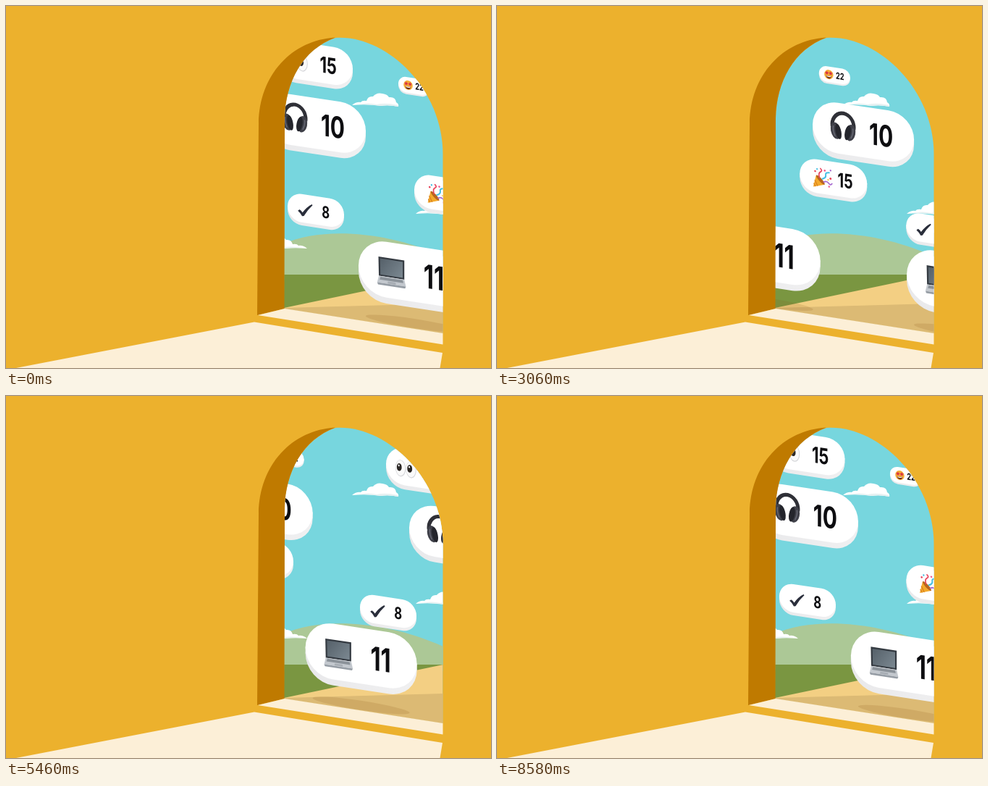
These frames come from a looping animation (670 by 500 pixels, 8.61 s). An HTML page with a canvas:

```html
<!DOCTYPE html>
<html lang="en">
<head>
<meta charset="utf-8">
<title>Archway</title>
<style>
  html, body { margin: 0; width: 100%; height: 100%; overflow: hidden; background: #ecb12d; }
  canvas { display: block; }
</style>
</head>
<body>
<canvas id="stage" width="670" height="500"></canvas>
<script>
const ctx = document.getElementById('stage').getContext('2d');
const LOOP = 8610;
const TICK = 30;
const SLOPE = 0.152;   // tilt of the plane the pills lie and travel on
const NARROW = 0.73;   // foreshortening of lettering on that plane
const LAP = 273.4;

function fill(color, path) {
  ctx.fillStyle = color;
  ctx.fill(path);
}

function poly(color, ...pts) {
  ctx.beginPath();
  for (let i = 0; i < pts.length; i += 2) ctx.lineTo(pts[i], pts[i + 1]);
  ctx.closePath();
  ctx.fillStyle = color;
  ctx.fill();
}

function oval(color, x, y, rx, ry, turn = 0) {
  ctx.beginPath();
  ctx.ellipse(x, y, rx, ry, turn, 0, Math.PI * 2);
  ctx.fillStyle = color;
  ctx.fill();
}

function line(color, width, d) {
  ctx.strokeStyle = color;
  ctx.lineWidth = width;
  ctx.lineCap = 'round';
  ctx.stroke(new Path2D(d));
}

function star(color, cx, cy, r) {
  const pts = [];
  for (let i = 0; i < 10; i++) {
    const a = i * Math.PI / 5 - Math.PI / 2;
    const q = i % 2 ? r * 0.5 : r;
    pts.push(cx + q * Math.cos(a), cy + q * Math.sin(a));
  }
  poly(color, ...pts);
}

// Icons are drawn in pill units: the pill is 140 wide, centred on 0,0.
const icons = {
  headphones() {
    ctx.strokeStyle = '#2f3037';
    ctx.lineWidth = 5;
    ctx.beginPath();
    ctx.ellipse(-28, -3, 15, 17.5, 0, Math.PI * 0.95, Math.PI * 2.05);
    ctx.stroke();
    oval('#3f4049', -38, 5, 7, 11.5, -0.2);
    oval('#3f4049', -18, 5, 7, 11.5, 0.2);
    oval('#24252c', -34.5, 5.5, 4, 10.5, -0.2);
    oval('#24252c', -21.5, 5.5, 4, 10.5, 0.2);
    line('#686a76', 1.3, 'M-41.5-1Q-42.5 5-39 12M-14.5-1Q-13.5 5-17 12');
  },

  laptop() {
    poly('#343a41', -45, -14, -12.5, -14, -12.5, 10, -44.5, 10);
    const g = ctx.createLinearGradient(-42, -12, -14, 8);
    g.addColorStop(0, '#56616a');
    g.addColorStop(1, '#7c8992');
    poly(g, -43, -12, -14.5, -12, -14.5, 8, -42.5, 8);
    poly('#c3c8ce', -44.5, 10, -12.5, 10, -10.5, 18.5, -46.5, 18.5);
    poly('#8b9299', -42.5, 11, -14.5, 11, -13.7, 14.5, -43.5, 14.5);
    poly('#a7adb4', -33, 15.5, -23.5, 15.5, -23, 18, -33.6, 18);
    poly('#969da5', -46.5, 18.5, -10.5, 18.5, -11.5, 21, -45.5, 21);
  },

  check() {
    fill('#2a2e3b', new Path2D('M-44.5 8.5L-40.5 5Q-36 7-33 11.5Q-23-4-10-12.5L-8-10.5Q-20 2-29.5 19.5L-34 20.5Q-38 13-44.5 8.5Z'));
  },

  eyes() {
    for (const x of [-43, -23.5]) {
      oval('#d6d7da', x, 5, 9.8, 15.5);
      oval('#fafafa', x - 0.3, 4.6, 8.7, 14.3);
      oval('#2b2725', x - 2.5, 3.5, 4.6, 7);
      oval('#ffffff', x - 3.3, 0.5, 1.4, 1.9);
    }
  },

  party() {
    poly('#f3a92c', -42, 24, -36, -1, -18, 16);
    oval('#b8651f', -27, 7.5, 3.5, 12, -0.8);
    line('#d9801e', 2, 'M-38.5 10L-33 20.5M-40.5 17L-37.5 22');
    line('#e8475f', 2.6, 'M-29 3Q-32-6-27-9T-27-16');
    line('#45bfe3', 3, 'M-23 5Q-15 2-16-4T-9-10');
    line('#a76bd0', 2.6, 'M-20 11Q-14 7-10 12T-3 12');
    oval('#e8475f', -38, -9, 2, 2);
    oval('#f0568f', -18, -13, 2, 2);
    oval('#45bfe3', -34, -14, 1.8, 1.8);
    oval('#e8475f', -6, 2, 2.2, 2.2);
    oval('#f5c23e', -11, 5, 1.7, 1.7);
    oval('#a76bd0', -6, -15, 1.8, 1.8);
    oval('#f0568f', -9, 19, 1.8, 1.8);
  },

  starry() {
    oval('#f4ad38', -26, 2, 20.5, 21);
    star('#dc3340', -34.5, -4, 9.5);
    star('#dc3340', -17.5, -4, 9.5);
    fill('#6b2b16', new Path2D('M-38 7Q-26 11-14 7Q-15 20-26 20Q-37 20-38 7Z'));
    fill('#ffffff', new Path2D('M-36 8Q-26 11-16 8L-17 12Q-26 14-35 12Z'));
  }
};

// x, y: centre at time 0; travel: distance per loop; span: gap between copies
const pills = [
  { icon: 'starry',     text: '22', x: 563.5, y: 110,   w: 43,  travel: LAP,       span: LAP },
  { icon: 'eyes',       text: '15', x: 427,   y: 78,    w: 104, travel: LAP * 1.5, span: LAP * 1.5 },
  { icon: 'party',      text: '15', x: 610.5, y: 260,   w: 93,  travel: LAP * 1.5, span: LAP * 1.5 },
  { icon: 'check',      text: '8',  x: 428,   y: 281.7, w: 78,  travel: LAP,       span: LAP },
  { icon: 'headphones', text: '10', x: 427,   y: 161,   w: 140, travel: LAP * 2,   span: LAP },
  { icon: 'laptop',     text: '11', x: 564,   y: 369,   w: 154, travel: LAP * 2,   span: LAP, shadow: true }
];

function capsule(color, y) {
  ctx.beginPath();
  ctx.roundRect(-70, y - 35, 140, 70, 35);
  ctx.fillStyle = color;
  ctx.fill();
}

function drawPill(p, x, y) {
  const k = p.w / 140;
  ctx.save();
  ctx.transform(k, SLOPE * k, 0, k, x, y);
  const side = ctx.createLinearGradient(-70, 0, 70, 0);
  side.addColorStop(0, '#e9e9eb');
  side.addColorStop(1, '#f0f0f1');
  capsule(side, 8.5);
  ctx.fillRect(-70, 0, 140, 8.5);
  capsule('#ffffff', 1);
  icons[p.icon]();
  ctx.translate(24.5, 16.5);
  ctx.scale(NARROW, 1);
  ctx.font = '700 41px Inter, "Liberation Sans", sans-serif';
  ctx.textAlign = 'center';
  ctx.fillStyle = '#0d0d10';
  ctx.fillText(p.text, 0, 0);
  ctx.restore();
}

function eachCopy(p, phase, draw) {
  for (let i = -1; i <= 2; i++) {
    const shift = i * p.span - p.travel * phase;
    const x = p.x + shift;
    if (x + p.w / 2 > 380 && x - p.w / 2 < 610) draw(x, p.y + SLOPE * shift);
  }
}

const cloudShape = new Path2D('M0 16Q6 11 12 12Q14 9 20 10Q22 3 29 4Q34-2 42 0Q49 1 51 5Q60 4 61 12Q65 14 64 18Q50 15 40 17Q20 14 0 16Z');
const cloudShade = new Path2D('M6 15Q24 12 34 15Q46 12 63 16L64 18Q50 15 40 17Q20 14 6 15Z');

function cloud(x, y, flip) {
  ctx.save();
  ctx.translate(x, y);
  ctx.scale(flip, 1);
  fill('#ffffff', cloudShape);
  fill('#e6f0f1', cloudShade);
  ctx.restore();
}

const opening = new Path2D('M384 418L385 155C386 105 410 60 455 44C523 39 603.5 112 603.5 205V452Z');
const jamb = new Path2D('M347 427L349 162C350 95 395 47 455 43.5C410 60 386 105 385 155L384.5 418Z');
const hill = new Path2D('M380 330C430 306 520 308 606 347V375H380Z');

function landscape() {
  ctx.fillStyle = '#77d6de';
  ctx.fillRect(380, 40, 230, 340);
  fill('#acc896', hill);
  ctx.fillStyle = '#7a9641';
  ctx.fillRect(380, 371, 230, 90);
  poly('#f3cf83', 384, 417, 606, 370.5, 606, 456, 384, 420);
  poly('#dcba74', 384, 417, 606, 411, 606, 456, 384, 420);
  cloud(478, 121, 1);
  cloud(566, 271, 1);
  cloud(416, 319, -1);
}

function shadow(x, y) {
  ctx.save();
  ctx.transform(1, SLOPE, 0, 1, x, y + 69.5);
  oval('rgba(135, 90, 30, 0.16)', 0, 0, 67, 6.5);
  ctx.restore();
}

function draw(ms) {
  const phase = Math.floor((ms % LOOP) / TICK) * TICK / LOOP;

  ctx.fillStyle = '#ecb12d';
  ctx.fillRect(0, 0, 670, 500);

  ctx.save();
  ctx.clip(opening);
  landscape();
  for (const p of pills) {
    if (p.shadow) eachCopy(p, phase, shadow);
  }
  for (const p of pills) eachCopy(p, phase, (x, y) => drawPill(p, x, y));
  ctx.restore();

  fill('#bf7a00', jamb);
  poly('#fcefd7', 348, 427, 385, 418, 603.5, 452, 603.5, 467.5);
  poly('#fcefd7', 14, 500, 343, 436.5, 603, 479, 599.5, 500);
}

function frame(now) {
  draw(Math.max(0, now));
  requestAnimationFrame(frame);
}

draw(0);
requestAnimationFrame(frame);
</script>
</body>
</html>
```
